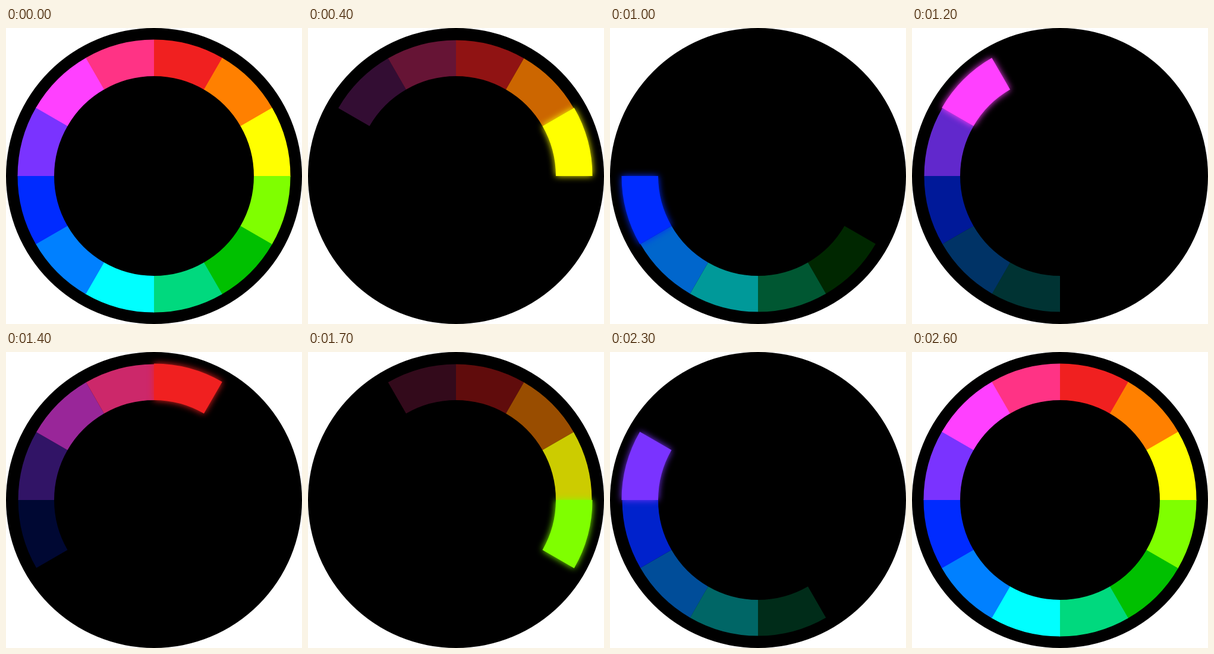
An HTML page with a canvas for the animation above (2.7 s loop, 498 by 498 pixels).

```html
<!DOCTYPE html>
<html lang="en">
<head>
<meta charset="utf-8">
<title>Colour wheel chase</title>
<style>
  html, body { margin: 0; width: 100%; height: 100%; overflow: hidden; background: #fff; }
  canvas { display: block; }
</style>
</head>
<body>
<canvas id="stage" width="498" height="498"></canvas>
<script>
const ctx = document.getElementById('stage').getContext('2d');
const COLORS = [
  '#f02020', '#ff8000', '#ffff00', '#7fff00', '#00c000', '#00d97e',
  '#00ffff', '#0080ff', '#002bff', '#7a33ff', '#ff40ff', '#ff3385'
];
const COUNT = COLORS.length;
const CENTER = 249;
const INNER = 168;
const OUTER = 229.5;
const STEP_MS = 100;
const STEPS = 27;
const TAIL = 4;

function segment(index, outer = OUTER, overlap = 0) {
  const start = -Math.PI / 2 + index * Math.PI * 2 / COUNT;
  const end = start + Math.PI * 2 / COUNT + overlap;
  ctx.beginPath();
  ctx.arc(CENTER, CENTER, outer, start, end);
  ctx.arc(CENTER, CENTER, INNER, end, start, true);
  ctx.closePath();
  ctx.fillStyle = COLORS[index];
  ctx.fill();
}

function disc() {
  ctx.fillStyle = '#fff';
  ctx.fillRect(0, 0, 498, 498);
  ctx.fillStyle = '#000';
  ctx.beginPath();
  ctx.arc(CENTER, CENTER, 249, 0, Math.PI * 2);
  ctx.fill();
}

function wheel() {
  // A small overlap hides seams; the last segment must not cover the first.
  for (let i = 0; i < COUNT; i++) segment(i, OUTER, i < COUNT - 1 ? 0.005 : 0);
}

function chase(head) {
  for (let age = TAIL; age > 0; age--) {
    ctx.globalAlpha = 1 - age / (TAIL + 1);
    segment((head - age + COUNT) % COUNT, OUTER - 1);
  }
  ctx.globalAlpha = 1;
  ctx.save();
  ctx.shadowColor = COLORS[head];
  ctx.shadowBlur = 12;
  segment(head);
  ctx.restore();
}

function draw(now) {
  const step = Math.floor(now / STEP_MS) % STEPS;
  disc();
  if (step === 0 || step === STEPS - 1) wheel();
  else chase((step - 2 + COUNT) % COUNT);
}

let origin = null;
function tick(now) {
  if (origin === null) origin = now;
  draw(now - origin);
  requestAnimationFrame(tick);
}
draw(0);
requestAnimationFrame(tick);
</script>
</body>
</html>
```
